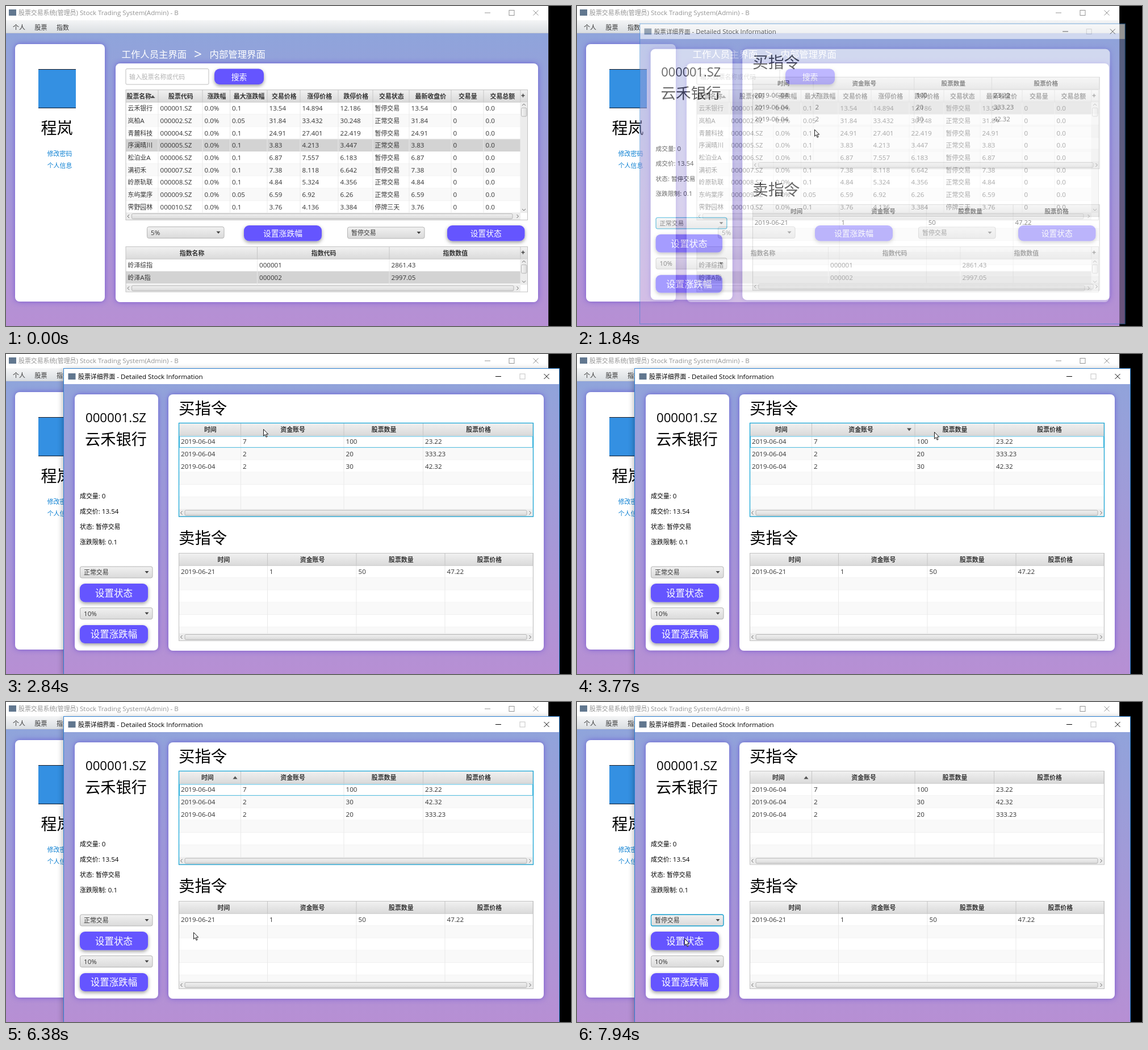
Recreate the animation shown at these times as an HTML page. Size 995x563 px, loop 8 s.

```html
<!DOCTYPE html>
<html lang="zh">
<head>
<meta charset="utf-8">
<title>股票交易系统</title>
<style>
html, body { margin: 0; width: 100%; height: 100%; overflow: hidden; background: #000; }
svg { display: block; width: 995px; height: 563px; font-family: "Open Sans", "Noto Sans CJK SC", "Noto Sans CJK", sans-serif; }
</style>
</head>
<body>
<svg viewBox="0 0 995 563">
  <defs>
    <linearGradient id="sky" x2="0" y2="1"><stop stop-color="#8fa4db"/><stop offset="1" stop-color="#b78fd4"/></linearGradient>
    <linearGradient id="bar" x2="0" y2="1"><stop stop-color="#f4f5f6"/><stop offset="1" stop-color="#d9dde1"/></linearGradient>
    <linearGradient id="head" x2="0" y2="1"><stop stop-color="#f1f1f1"/><stop offset="1" stop-color="#dadada"/></linearGradient>
    <linearGradient id="thumbV" x2="1" y2="0"><stop stop-color="#f4f4f4"/><stop offset="1" stop-color="#dcdcdc"/></linearGradient>
    <filter id="glow" x="-15%" y="-10%" width="130%" height="120%"><feDropShadow dx="0" dy="0" stdDeviation="5" flood-color="#5a3fd0" flood-opacity=".7"/></filter>
    <filter id="drop" x="-15%" y="-40%" width="130%" height="200%"><feDropShadow dx="0" dy="2.5" stdDeviation="3.2" flood-opacity=".4"/></filter>
    <filter id="blur" x="-10%" y="-10%" width="120%" height="120%"><feGaussianBlur stdDeviation="6"/></filter>
  </defs>
  <g id="main"></g>
  <rect id="shade" x="101" y="28" width="874" height="540" opacity=".35" filter="url(#blur)"/>
  <g id="win"></g>
  <path id="cursor" d="M.5.5V12.2L3.2 9.7 5.1 14.2 7 13.4 5.1 9H8.7Z" fill="#fff" stroke="#000" stroke-width=".9"/>
</svg>
<script>
const LOOP = 8000, ROW = 21.72, VIOLET = '#6554ff', FOCUS = '#1ca8d8';
const $ = id => document.getElementById(id);

const rect = (x, y, x2, y2, fill, more = '') =>
  `<rect x="${x}" y="${y}" width="${x2 - x}" height="${y2 - y}" fill="${fill}" ${more}/>`;
const path = (d, stroke, more = '') => `<path d="${d}" fill="none" stroke="${stroke}" ${more}/>`;
const tri = (x, y, down) => `<path d="M${x - 4} ${y + (down ? -2.5 : 2.5)}h8l-4 ${down ? 5 : -5}z" fill="#505050"/>`;

// y is the middle of the line; Latin runs are set slightly larger
function text(x, y, s, { size = 10.9, fill = '#333', mid = false, bold = false } = {}) {
  const runs = String(s).replace(/[\x20-\x7e]+/g, m => `<tspan font-size="${size * 1.065}">${m.replace('>', '&gt;')}</tspan>`);
  return `<text x="${x}" y="${y + size * .37}" font-size="${size}" fill="${fill}"${mid ? ' text-anchor="middle"' : ''}${bold ? ' font-weight="700"' : ''}>${runs}</text>`;
}

const panel = (x, y, x2, y2) => rect(x, y, x2, y2, '#fff', 'rx="8" filter="url(#glow)"');
const button = (x, y, x2, y2, s, size = 13.8) =>
  rect(x, y, x2, y2, VIOLET, 'rx="9" filter="url(#drop)"') + text((x + x2) / 2, (y + y2) / 2 + .3, s, { size, fill: '#fff', mid: true });
const ring = (x, y, x2, y2, w = 1.3, rx = 0) => rect(x, y, x2, y2, 'none', `rx="${rx}" stroke="${FOCUS}" stroke-width="${w}"`);

function combo(x, y, x2, s, focused) {
  return rect(x + .5, y + .5, x2 - .5, y + 20.5, 'url(#head)', 'rx="3" stroke="#b4b4b4"') +
    text(x + 7, y + 10.5, s) + `<path d="M${x2 - 14} ${y + 8.5}h7l-3.5 4z" fill="#404040"/>` +
    (focused ? ring(x + .5, y + .5, x2 - .5, y + 20.5, 1.3, 3) : '');
}

function hBar(x, x2, y, end) {
  return rect(x, y - 6, x2, y + 6, '#ececec') +
    rect(x + 10.5, y - 4.5, end, y + 4.5, 'url(#head)', 'rx="2" stroke="#b5b5b5"') +
    path(`M${x + 6} ${y - 3}l-3 3 3 3M${x2 - 6.5} ${y - 3}l3 3-3 3`, '#666');
}

function vBar(y, y2) {
  return rect(906, y, 918, y2, '#ececec') +
    rect(907.5, y + 10, 917, y + 25, 'url(#thumbV)', 'rx="2" stroke="#b5b5b5"') +
    path(`M909 ${y + 6}l3-3 3 3M909 ${y2 - 7}l3 3 3-3`, '#666');
}

// cols holds the left edge of each column and the right edge of the last
function table({ y, x2, y2, cols, heads, rows, thumb, sel = -1, selFill = '#d3d3d3', selText = '#333', sort = -1, down, corner }) {
  const x = cols[0], right = cols[cols.length - 1], top = y + 21.7, foot = y2 - 12.5;
  let out = rect(x, y, x2, y2, '#fff');
  for (let i = 0, r = top; r < foot - 1; i++, r += ROW) {
    const on = i === sel, end = Math.min(r + ROW, foot);
    out += rect(x, r, right, end, on ? selFill : i % 2 ? '#f9f9f9' : '#fff');
    if (!on) out += path(`M${x} ${end - .5}H${right}`, '#f1f1f1');
    (rows[i] || []).forEach((s, c) => out += text(cols[c] + 3.5, r + ROW / 2, s, { fill: on ? selText : '#333' }));
  }
  for (const c of cols.slice(1)) out += path(`M${c} ${top}V${foot}`, '#e9e9e9');
  out += rect(x, y, x2, top, 'url(#head)') + path(`M${x} ${top}H${x2}`, '#c8c8c8');
  heads.forEach((h, c) => {
    const a = cols[c], b = cols[c + 1], shift = c === sort ? 5 : 0;
    out += path(`M${b} ${y}V${top}`, '#c6c6c6') + text((a + b) / 2 + .8 - shift, y + 11.6, h, { mid: true, bold: true });
    if (shift) out += tri(b - 10, y + 11.6, down);
  });
  if (corner) out += path(`M907.5 ${y + 10}h6M910.5 ${y + 7}v6`, '#444', 'stroke-width="1.6"') + vBar(top, foot);
  return out + hBar(x, right, y2 - 6.5, thumb) + rect(x, y, x2, y2, 'none', 'stroke="#c2c2c2"');
}

function caption(x, y, color, maxColor) {
  return path(`M${x - 5} ${y}h10`, color) +
    rect(x + 38, y - 4.5, x + 47, y + 4.5, 'none', `stroke="${maxColor}"`) +
    path(`M${x + 80.5} ${y - 4.5}l9 9m0-9l-9 9`, color);
}
const icon = (x, y) => rect(x, y, x + 13, y + 11, '#61778f');

const HALT = '暂停交易', OPEN = '正常交易', BANK = '云禾银行';
const STOCKS = [
  [BANK, 1, '0.1', '13.54', '14.894', '12.186', HALT],
  ['岚柏A', 2, '0.05', '31.84', '33.432', '30.248', OPEN],
  ['青麓科技', 4, '0.1', '24.91', '27.401', '22.419', HALT],
  ['序澜晴川', 5, '0.1', '3.83', '4.213', '3.447', OPEN],
  ['松泊业A', 6, '0.1', '6.87', '7.557', '6.183', HALT],
  ['满初禾', 7, '0.1', '7.38', '8.118', '6.642', HALT],
  ['岭原轨联', 8, '0.1', '4.84', '5.324', '4.356', OPEN],
  ['东屿棠序', 9, '0.05', '6.59', '6.92', '6.26', OPEN],
  ['霁野园林', 10, '0.1', '3.76', '4.136', '3.384', '停牌三天'],
].map(([name, code, max, price, up, low, state]) =>
  [name, String(code).padStart(6, '0') + '.SZ', '0.0%', max, price, up, low, state, price, '0', '0.0']);

function drawMain(sel, active) {
  const ink = active ? '#000' : '#949494';
  return rect(0, 0, 955, 25, '#fff') + icon(5, 6) +
    text(22, 12.3, '股票交易系统(管理员) Stock Trading System(Admin) - B', { fill: ink }) + caption(848, 12, ink, ink) +
    rect(0, 25, 955, 48, 'url(#bar)') + path('M0 47.8H955', '#c3c7cc') +
    [[12, '个人'], [50.5, '股票'], [89, '指数']].map(([x, s]) => text(x, 37.5, s)).join('') +
    rect(0, 48, 955, 563, 'url(#sky)') +
    panel(16, 67, 174, 520) + panel(193, 101, 937, 521) +
    rect(57, 111, 123, 180, '#3490e2') + path('M57 111.5H123M57 179.3H123', '#1b1b24') +
    text(89.5, 215, '程岚', { size: 28, fill: '#000', mid: true }) +
    text(94.5, 260, '修改密码', { fill: '#0a7fd2', mid: true }) + text(94.5, 280.5, '个人信息', { fill: '#0a7fd2', mid: true }) +
    [[203.5, '工作人员主界面'], [331, '>'], [358.5, '内部管理界面']]
      .map(([x, s]) => text(x, 84.5, s, { size: s === '>' ? 23 : 16.4, fill: '#fff' })).join('') +
    rect(211, 110.5, 357, 138, '#fff', 'rx="2" stroke="#bdbdbd"') + text(217, 124.5, '输入股票名称或代码', { fill: '#b3b3b3' }) +
    button(367, 110.5, 454, 138, '搜索') +
    table({
      y: 147.5, x2: 918.5, y2: 376.5, thumb: 892, corner: true, rows: STOCKS,
      cols: [211, 268, 346, 394.5, 460, 518, 585, 646, 710, 784, 841, 906],
      heads: ['', '股票代码', '涨跌幅', '最大涨跌幅', '交易价格', '涨停价格', '跌停价格', '交易状态', '最新收盘价', '交易量', '交易总额'],
      sel, selFill: active ? '#0096c9' : '#d3d3d3', selText: active ? '#fff' : '#333',
    }) +
    text(212.5, 159.1, '股票名称', { bold: true }) + tri(258.5, 159.5) +
    (active ? ring(210.5, 147.5, 918.5, 376.5) : '') +
    combo(248, 388, 384.5, '5%') + button(419, 386, 556, 413.5, '设置涨跌幅') +
    combo(601, 388.5, 737.5, HALT) + button(777, 386, 913.5, 413.5, '设置状态') +
    table({
      y: 423.5, x2: 918.5, y2: 503, thumb: 894, corner: true, sel: 1,
      cols: [211, 442.5, 675, 906], heads: ['指数名称', '指数代码', '指数数值'],
      rows: [['岭泽综指', '000001', '2861.43'], ['岭泽A指', '000002', '2997.05']],
    }) +
    path('M955.5 0V563', active ? '#1883d7' : '#222');
}

const BUYS = [['7', '100', '23.22'], ['2', '20', '333.23'], ['2', '30', '42.32']].map(r => ['2019-06-04', ...r]);
const HEADS = ['时间', '资金账号', '股票数量', '股票价格'];

function popup(hover) {
  return rect(129.5, 395.5, 257.5, 456, '#fff', 'stroke="#bcbcbc"') +
    [OPEN, HALT, '停牌三天'].map((s, i) => {
      const y = 396 + i * 20, on = i === hover;
      return (on ? rect(130, y, 257, y + 20, '#0096c9') : '') + text(137, y + 10, s, { fill: on ? '#fff' : '#333' });
    }).join('');
}

function drawWin(order, sort, down, focus, state, hover) {
  const ink = { fill: '#000' }, onTable = focus === 'table';
  return rect(102, 26, 974, 565, 'url(#sky)') + rect(102, 26, 974, 53, '#fff') + icon(109.5, 34) +
    text(127, 39.7, '股票详细界面 - Detailed Stock Information', ink) + caption(867, 39.5, '#000', '#c4c4c4') +
    panel(121, 71, 268, 521.5) + panel(286, 71, 947, 522) +
    text(193.5, 112.5, '000001.SZ', { size: 20.9, fill: '#000', mid: true }) +
    text(193.5, 150, BANK, { size: 27.2, fill: '#000', mid: true }) +
    ['成交量: 0', '成交价: 13.54', '状态: ' + HALT, '涨跌限制: 0.1'].map((s, i) => text(130, 250 + i * 27.1, s, ink)).join('') +
    combo(130, 373.5, 258.5, state, focus === 'combo') + button(130, 404, 250, 436.5, '设置状态', 16.5) +
    combo(130, 446, 258.5, '10%') + button(130, 477, 250, 509, '设置涨跌幅', 16.5) +
    text(304, 95, '买指令', { size: 28.4, fill: '#000' }) + text(304, 323.5, '卖指令', { size: 28.4, fill: '#000' }) +
    table({
      y: 121.5, x2: 928.5, y2: 286, thumb: 917, cols: [304.5, 413.5, 595, 734.5, 928],
      heads: HEADS, rows: [...order].map(i => BUYS[i]), sort, down,
    }) +
    (onTable ? ring(304.5, 121.5, 928.5, 286) + ring(305.5, 145, 927.5, 164.3, .8) : '') +
    table({
      y: 350.5, x2: 928.5, y2: 504.5, thumb: 917, cols: [304.5, 460.5, 617, 773, 928],
      heads: HEADS, rows: [['2019-06-21', '1', '50', '47.22']],
    }) +
    (hover < 0 ? '' : popup(hover)) +
    rect(101.5, 25.5, 974.5, 565, 'none', 'stroke="#2b80d2"');
}

// time, row order, sorted column, descending
const SORTS = [[0, '012', -1], [3460, '120', 1], [3540, '012', 1, true], [4000, '120', 2], [4610, '021', 3], [5300, '021', 0]];
// time, opacity, scale
const OPENING = [[0, 0, 1], [1770, .2, .965], [1840, .58, .979], [2010, .78, .99], [2040, .86, .993], [2090, .95, .998], [2160, 1, 1]];
// time, x, y
const POINTER = [
  [140, 826, 520], [760, 272, 186], [1000, 272, 184], [1290, 336, 184], [1700, 336, 184], [1834, 418, 217],
  [2090, 418, 217], [2770, 453, 132], [3000, 453, 132], [3310, 497, 136], [3540, 497, 136], [3770, 636, 137],
  [4090, 636, 137], [4380, 791, 138], [4610, 791, 138], [4755, 731, 154], [5380, 396, 137], [5460, 396, 137],
  [5990, 481, 311], [6160, 481, 311], [6375, 331, 405], [6530, 262, 421], [6930, 195, 376], [7170, 195, 376],
  [7540, 191, 408], [7640, 191, 408], [7900, 189, 416],
];

const stepAt = (list, t) => list.filter(k => k[0] <= t).pop();

// the pointer is sampled about 13 times a second
function pointerAt(t) {
  t = 140 + 77 * Math.floor((t - 140) / 77);
  const i = POINTER.findIndex(k => k[0] > t);
  if (i < 0) return POINTER[POINTER.length - 1].slice(1);
  const a = POINTER[i - 1], b = POINTER[i], f = (t - a[0]) / (b[0] - a[0]);
  return [1, 2].map(n => Math.round(a[n] + (b[n] - a[n]) * f));
}

const drawn = {};
function paint(id, draw, ...args) {
  const key = args.join();
  if (drawn[id] === key) return;
  drawn[id] = key;
  $(id).innerHTML = draw(...args);
}

function render(t) {
  paint('main', drawMain, t < 910 ? 3 : 0, t >= 910 && t < 1770);
  const [, order, sort, down = false] = stepAt(SORTS, t);
  const chosen = t >= 7860;
  const focus = t >= 2840 && t < 7010 ? 'table' : 'combo';
  const hover = t < 7080 || chosen ? -1 : t < 7710 ? 0 : 1;
  paint('win', drawWin, order, sort, down, focus, chosen ? HALT : OPEN, hover);

  const [, opacity, scale] = stepAt(OPENING, t);
  const win = $('win');
  win.setAttribute('opacity', opacity);
  win.setAttribute('transform', `translate(538 295.3) scale(${scale}) translate(-538 -295.3)`);
  win.style.display = opacity ? '' : 'none';
  $('shade').style.display = opacity === 1 ? '' : 'none';

  const cursor = $('cursor');
  cursor.style.display = t < 140 ? 'none' : '';
  if (t >= 140) cursor.setAttribute('transform', `translate(${pointerAt(t)})`);
}

const start = performance.now();
function frame() {
  render((performance.now() - start) % LOOP);
  requestAnimationFrame(frame);
}
frame();
</script>
</body>
</html>
```
